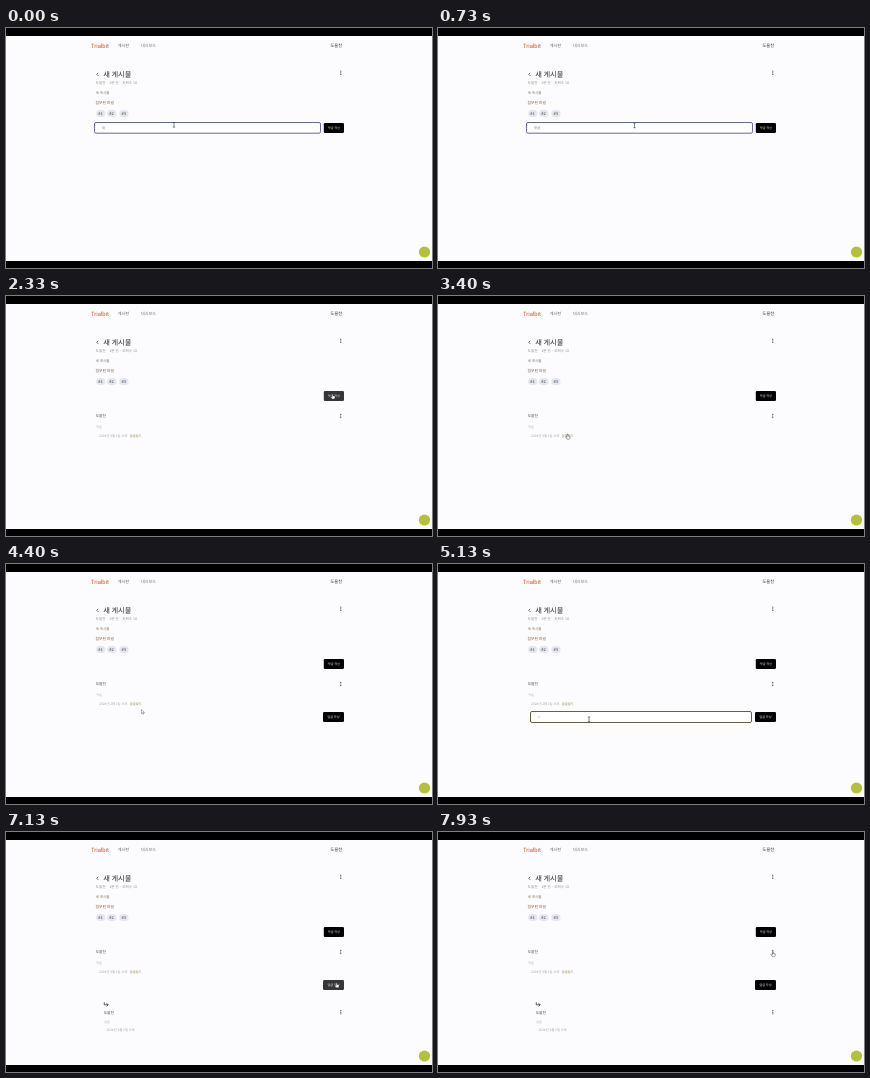
An HTML page that plays this animation: 426x240 px, repeating every 8000 ms.

```html
<!DOCTYPE html>
<html>
<head>
<meta charset="utf-8">
<title>Comment thread</title>
<style>
html, body { margin: 0; width: 100%; height: 100%; overflow: hidden; background: #000; }
svg { display: block; width: 100vw; height: 100vh; }
text { font-family: "Noto Sans CJK KR", "Noto Sans CJK", sans-serif; text-rendering: geometricPrecision; }
.brand { font-family: Roboto, sans-serif; }
</style>
</head>
<body>
<svg id="stage" viewBox="0 0 426 240"></svg>
<script>
const LOOP = 8000;
const stage = document.getElementById('stage');

function add(tag, attrs, parent = stage) {
  const node = document.createElementNS('http://www.w3.org/2000/svg', tag);
  for (const key in attrs) node.setAttribute(key, attrs[key]);
  parent.append(node);
  return node;
}
const group = () => add('g', {});
const rect = (x, y, width, height, fill, rx = 0, parent = stage) =>
  add('rect', { x, y, width, height, fill, rx }, parent);

// y is the visual middle of the line
function label(text, x, y, size, fill, parent = stage, weight = 400, anchor = 'start') {
  const node = add('text', {
    x, y: y + size * 0.36, fill, 'font-size': size, 'font-weight': weight, 'text-anchor': anchor
  }, parent);
  node.textContent = text;
  return node;
}
function dots(y, parent = stage) {
  for (const dy of [-1.6, 0, 1.6]) add('circle', { cx: 334.8, cy: y + dy, r: 0.6, fill: '#444' }, parent);
}
function button(text, x, y, width, parent = stage) {
  const box = rect(x, y, width, 10, '#000', 1.2, parent);
  label(text, x + width / 2, y + 5, 3.1, '#eee', parent, 400, 'middle');
  return box;
}
function field(x, y, width, height, stroke) {
  const parent = group();
  add('rect', { x, y, width, height, rx: 1.5, fill: '#fff', stroke, 'stroke-width': 1 }, parent);
  const text = label('', x + 7.2, y + height / 2, 3.5, '#858585', parent);
  return { parent, text };
}

const AUTHOR = '도을찬';

rect(0, 8, 426, 225, '#fcfcfe');
label('Trialbit', 85, 17.4, 5.9, '#d2552c').setAttribute('class', 'brand');
label('게시판', 111.7, 17.4, 4.1, '#666');
label('대시보드', 135, 17.4, 4.1, '#777');
label(AUTHOR, 324.3, 17.4, 4.3, '#333');

add('path', { d: 'M92.2 44.8l-1.5 1.5 1.5 1.5', fill: 'none', stroke: '#444', 'stroke-width': 0.8 });
label('새 게시물', 97.2, 46, 7.2, '#2a2a2e', stage, 500);
dots(44.8);
label(AUTHOR + ' · 1분 전 · 조회수 10', 89.6, 55.1, 3.6, '#92928a');
label('새 게시물', 89.8, 65, 3.5, '#77705f');
label('첨부된 파일', 89.6, 74.9, 3.8, '#96572f', stage, 500);
[94.6, 105.6, 117.8].forEach((x, i) => {
  rect(x - 4.5, 82, 9.2, 7, '#e5e5ee', 3.5);
  label('#' + (i + 1), x, 85.5, 4, '#454550', stage, 400, 'middle');
});

const commentField = field(88.5, 94.5, 226, 10.7, '#656d96');
const commentButton = button('댓글 작성', 317.8, 95, 20.2);

const comment = group();
label(AUTHOR, 89.7, 120, 3.7, '#45453a', comment, 500);
dots(120, comment);
label('댓글', 90.2, 130.7, 3, '#aaa', comment);
label('· 2024년 2월 1일 오후', 90.5, 139.8, 3.3, '#a6a69e', comment);
label('답글달기', 123.8, 139.8, 3.2, '#8f8348', comment);

const replyForm = group();
const replyField = field(92.5, 147.5, 221, 11, '#66623c');
const replyButton = button('답글 작성', 317, 148, 21, replyForm);

const reply = group();
add('path', {
  d: 'M98.3 170.4v2.4h3.8M100.6 171.2l1.6 1.6-1.6 1.6',
  fill: 'none', stroke: '#333', 'stroke-width': 0.8
}, reply);
label(AUTHOR, 97.7, 180.2, 3.7, '#45453a', reply, 500);
dots(180.2, reply);
label('답글', 98.2, 189.8, 3, '#aaa', reply);
label('· 2024년 2월 1일 오후', 97.8, 197.8, 3.3, '#a6a69e', reply);

add('circle', { cx: 418.5, cy: 224, r: 5.6, fill: '#b3c236' });

// Pointer shapes share a hot spot at 0,0.
const pointers = { beam: group(), arrow: group(), hand: group() };
add('path', {
  d: 'M-1.2-2.3H1.2M0-2.3V2.3M-1.2 2.3H1.2', fill: 'none', stroke: '#333', 'stroke-width': 0.6
}, pointers.beam);
add('path', {
  d: 'M0-2V2.2L1 1.4 1.7 2.8 2.4 2.5 1.7 1H2.9Z', transform: 'translate(-.5 0)',
  fill: '#fff', stroke: '#555', 'stroke-width': 0.45
}, pointers.arrow);
add('path', {
  d: 'M-.9-2.3h.9v1.7l2 .5v1.7l-.7 1.1h-2.2l-1.4-2 .5-.5.9.6Z',
  fill: '#fff', stroke: '#333', 'stroke-width': 0.45
}, pointers.hand);

// time, x, y
const route = [
  [0, 168, 96.8], [150, 168, 96.8], [650, 196.5, 97.4], [1250, 196.5, 97.4], [1850, 327, 100.3],
  [2600, 327, 100.3], [3350, 130, 140.5], [3950, 130, 140.5], [4350, 136, 147.5], [4450, 136, 147.5],
  [4850, 151, 155.3], [6000, 151, 155.3], [6550, 331, 153], [7250, 331, 153],
  [7700, 335.3, 122], [8000, 335.3, 122]
];
const commentTyping = [[0, '대'], [330, '댓'], [530, '댓그'], [670, '댓글']];
const replyTyping = [[0, ''], [5130, 'ㄷ'], [5270, '다'], [5400, '답'], [5530, '답그'], [5730, '답글']];

function pointerAt(t) {
  const i = Math.max(1, route.findIndex(step => step[0] >= t));
  const [t0, x0, y0] = route[i - 1], [t1, x1, y1] = route[i];
  const p = (t - t0) / (t1 - t0), e = p * p * (3 - 2 * p);
  return [x0 + (x1 - x0) * e, y0 + (y1 - y0) * e];
}
const typed = (steps, t) => steps.filter(step => step[0] <= t).pop()[1];
const show = (node, on) => node.setAttribute('visibility', on ? 'visible' : 'hidden');
const inside = (x, y, left, top, right, bottom) => x > left && x < right && y > top && y < bottom;

function render(t) {
  const [x, y] = pointerAt(t);
  const posted = t >= 2200;
  const replying = t >= 3800;
  const overComment = inside(x, y, 317.8, 95, 338, 105);
  const overReply = replying && inside(x, y, 317, 148, 338, 158);
  const overLink = posted && inside(x, y, 123, 137, 136, 143);
  const overMenu = inside(x, y, 332, 117, 338, 124);
  const overField = posted
    ? replying && inside(x, y, 92, 148, 314, 159)
    : inside(x, y, 88, 94, 315, 106);

  show(commentField.parent, t < 2070);
  commentField.text.textContent = typed(commentTyping, t);
  show(comment, posted);
  show(replyForm, replying);
  show(replyField.parent, t >= 4870 && t < 6800);
  replyField.text.textContent = typed(replyTyping, t);
  show(reply, t >= 6930);
  commentButton.setAttribute('fill', overComment ? '#36363a' : '#000');
  replyButton.setAttribute('fill', overReply ? '#36363a' : '#000');

  const kind = overComment || overReply || overLink || overMenu ? 'hand'
    : overField ? 'beam' : 'arrow';
  for (const name in pointers) {
    show(pointers[name], name === kind);
    pointers[name].setAttribute('transform', `translate(${x} ${y})`);
  }
}

const start = performance.now();
function tick(now) {
  render(Math.max(0, now - start) % LOOP);
  requestAnimationFrame(tick);
}
render(0);
requestAnimationFrame(tick);
</script>
</body>
</html>
```
